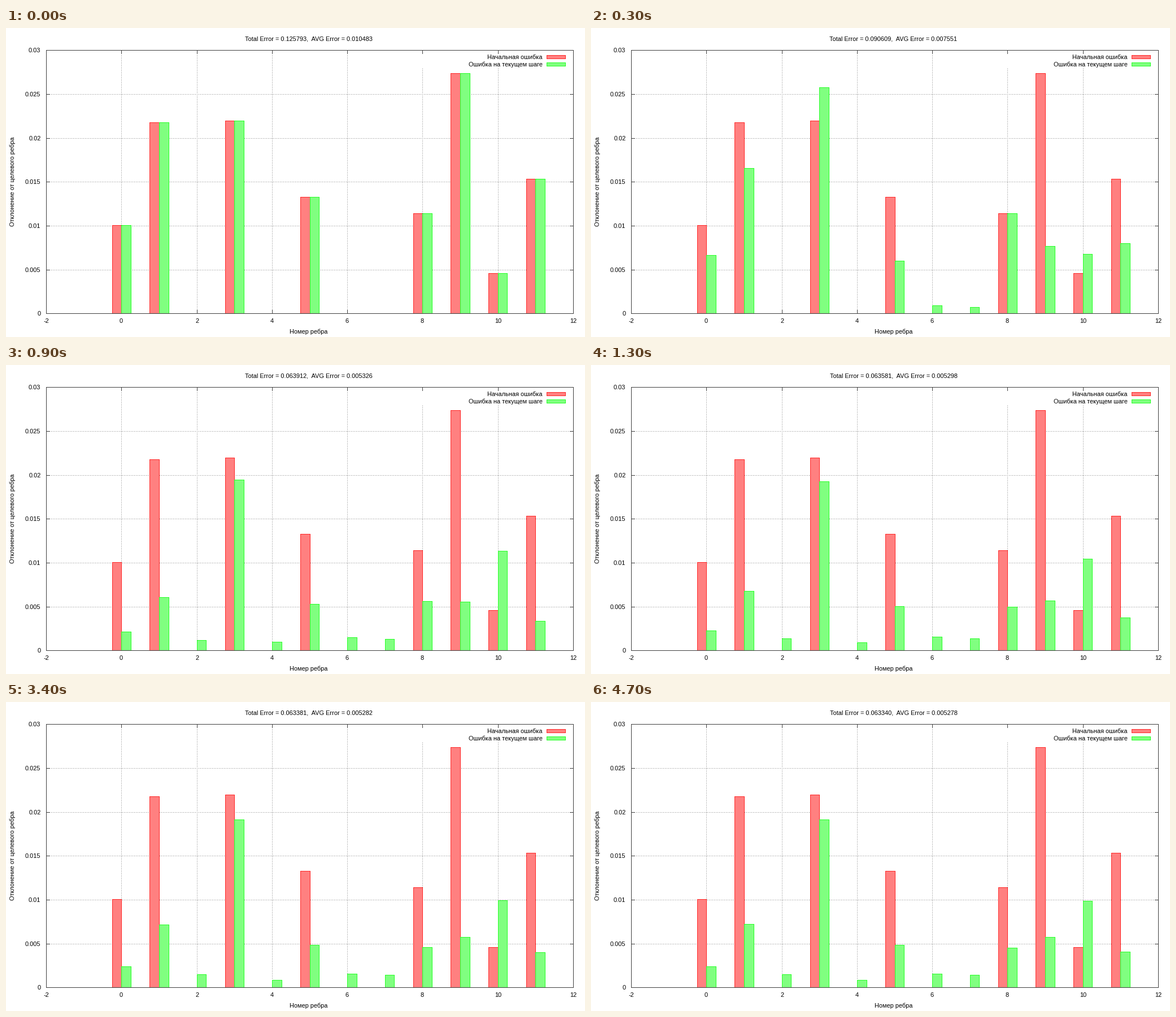
A matplotlib script for the animation above (5000 ms loop, 1025 by 547 pixels).

```python
import numpy as np
import matplotlib.pyplot as plt
from matplotlib.animation import FuncAnimation
from matplotlib.patches import Rectangle

W, H, DPI = 1025, 547, 64
PX = 72 / DPI  # points per pixel
LEFT, RIGHT, TOP, BOTTOM = 71, 1004, 39, 505
FONT = dict(family="Liberation Sans", size=11 * PX, color="black")
INK, GRID = "#404040", "#808080"
RED, GREEN = ("#ff2828", "#ff8080"), ("#28ff28", "#80ff80")
BARS = 12

# Frames (100 ms each) at which the optimiser accepts a new state
STEPS = [0, 1, 3, 4, 5, 6, 8, 9, 10, 11, 13, 15, 18, 21, 34, 35, 37, 39, 43, 47]

# Key poses by step number: error of every edge, in millionths
POSES = {
    0: [10055, 21775, 0, 21995, 0, 13275, 0, 0, 11395, 27368, 4575, 15355],
    2: [6670, 16590, 40, 25755, 40, 6025, 935, 712, 11395, 7665, 6765, 8017],
    7: [2130, 6090, 1200, 19450, 1005, 5285, 1520, 1325, 5640, 5545, 11337, 3385],
    19: [2414, 7250, 1520, 19158, 869, 4860, 1609, 1450, 4539, 5762, 9853, 4056],
}


def errors(step):
    """Ease out from the last key pose towards the next one."""
    marks = list(POSES)
    a = max(m for m in marks if m <= step)
    b = min(m for m in marks if m >= step)
    start, end = np.array(POSES[a]), np.array(POSES[b])
    u = (step - a) / max(b - a, 1)
    return start + (end - start) * (1 - (1 - u) ** 3)


def col(x):
    return round(LEFT + (x + 2) * (RIGHT - LEFT) / 14)


def row(micro):
    return BOTTOM - int(micro * (BOTTOM - TOP) / 30000)


fig = plt.figure(figsize=(W / DPI, H / DPI), dpi=DPI, facecolor="white")
ax = fig.add_axes([0, 0, 1, 1])
ax.set_xlim(0, W)
ax.set_ylim(H, 0)
ax.axis("off")


def block(x0, y0, x1, y1, color, z):
    """Filled rectangle covering whole pixels, both ends included."""
    return ax.add_patch(Rectangle((x0, y0), x1 - x0 + 1, y1 - y0 + 1, lw=0,
                                  fc=color, zorder=z))


def outlined(x0, y0, x1, y1, colors, z):
    edge, fill = colors
    return (block(x0, y0, x1, y1, edge, z),
            block(x0 + 1, y0 + 1, x1 - 1, max(y1 - 1, y0), fill, z + 0.1))


def dotted(xs, ys):
    ax.plot(xs, ys, color=GRID, lw=PX, ls=(0, (1, 2)), dash_capstyle="butt",
            snap=False, zorder=1)


def label(x, y, text, ha="center", **extra):
    return ax.text(x, y, text, ha=ha, va="baseline", zorder=8, **FONT, **extra)


def draw_axes():
    for x in range(-2, 13, 2):
        c = col(x)
        label(c, 522, str(x))
        if LEFT < c < RIGHT:
            # The key leaves a blank patch in the grid
            dotted([c + 0.5] * 2, [BOTTOM, 72 if x >= 8 else TOP])
            block(c, TOP, c, TOP + 6, INK, 2)
            block(c, BOTTOM - 6, c, BOTTOM, INK, 2)
    for k in range(7):
        r = row(k * 5000)
        label(61.5, r + 4, f"{k * 0.005:g}", ha="right")
        if TOP < r < BOTTOM:
            dotted([LEFT, RIGHT], [r + 0.5] * 2)
            block(LEFT, r, LEFT + 6, r, INK, 2)
            block(RIGHT - 6, r, RIGHT, r, INK, 2)
    for y in (TOP, BOTTOM):
        block(LEFT, y, RIGHT, y, INK, 7)
    for x in (LEFT, RIGHT):
        block(x, TOP, x, BOTTOM, INK, 7)
    label(535.5, 541, "Номер ребра")
    label(15, 272, "Отклонение от целевого ребра", rotation=90,
          rotation_mode="anchor")


def draw_key():
    for y, text, colors in [(48, "Начальная ошибка", RED),
                            (61, "Ошибка на текущем шаге", GREEN)]:
        label(949.5, y + 7, text, ha="right")
        outlined(957, y, 990, y + 6, colors, 5)


draw_axes()
draw_key()
for i, v in enumerate(errors(0)):
    if v:
        outlined(col(i - 0.25), row(v), col(i), BOTTOM, RED, 3)
bars = [outlined(col(i), BOTTOM, col(i + 0.25), BOTTOM, GREEN, 4)
        for i in range(BARS)]
title = label(535.5, 23, "")


def draw(n):
    values = errors(sum(s <= n for s in STEPS) - 1)
    for (edge, fill), v in zip(bars, values):
        top = row(v)
        edge.set_y(top)
        edge.set_height(BOTTOM - top + 1)
        fill.set_y(top + 1)
        fill.set_height(max(BOTTOM - top - 1, 0))
    total = values.sum() / 1e6
    title.set_text(f"Total Error = {total:.6f},  AVG Error = {total / BARS:.6f}")
    return [title]


anim = FuncAnimation(fig, draw, frames=50, interval=100, repeat=True,
                     repeat_delay=0, blit=False)
plt.show()
```
